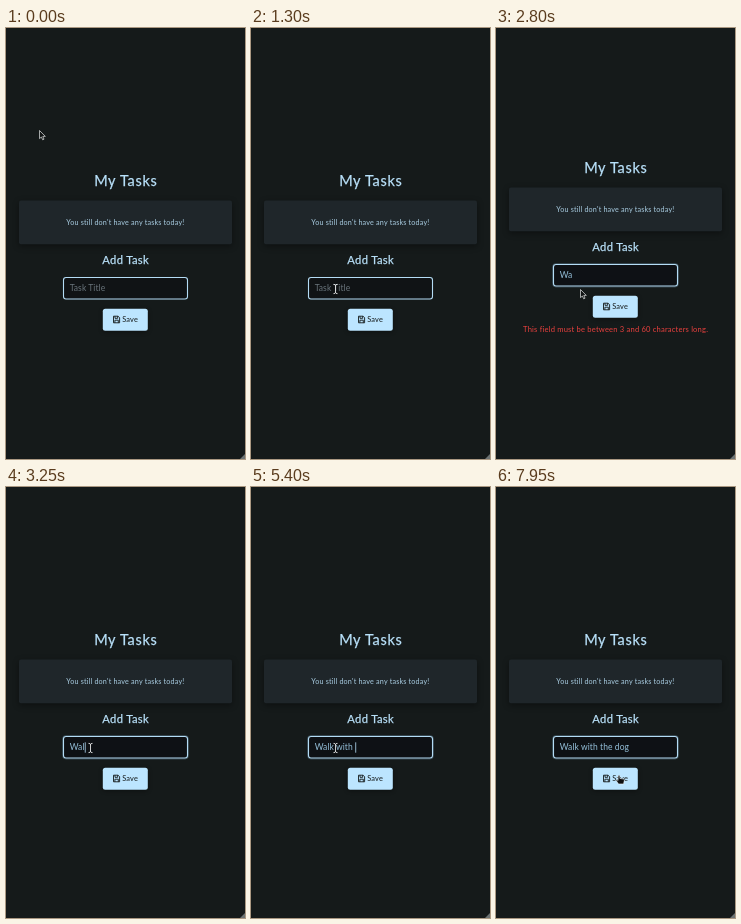
Recreate the animation shown at these times as an HTML page. Size 239 px wide and 431 px high, loop 8 s.

```html
<!DOCTYPE html>
<html lang="en">
<head>
<meta charset="utf-8">
<title>My Tasks</title>
<style>
  html, body { margin: 0; width: 100%; height: 100%; overflow: hidden; background: #151a1a; }
  svg { display: block; width: 100vw; height: 100vh; }
  text { font-family: Lato, "Open Sans", sans-serif; fill: #b9e1fa; white-space: pre; }
  .mid { text-anchor: middle; }
  .title, .sub { stroke: #b9e1fa; stroke-width: .25; }
  .title { font-size: 14.5px; letter-spacing: .7px; }
  .sub { font-size: 11.2px; letter-spacing: .36px; }
  .note { font-size: 7.2px; letter-spacing: .18px; fill: #a9cde2; }
  .field { font-size: 8.5px; letter-spacing: .08px; fill: #95c0da; }
  .hint { fill: #68737a; }
  .save { font-size: 7.4px; letter-spacing: .15px; fill: #151a1a; }
  .error { font-size: 7.6px; letter-spacing: .18px; fill: #e8403e; }
  .card { fill: #1f262a; filter: drop-shadow(0 2px 3px rgba(0, 0, 0, .4)); }
  .button { fill: #bce5ff; filter: drop-shadow(0 1px 2px rgba(0, 0, 0, .4)); }
  .icon { fill: none; stroke: #151a1a; stroke-width: .9; stroke-linejoin: round; }
</style>
</head>
<body>
<svg viewBox="0 0 239 431">
  <rect width="239" height="431" fill="#151a1a"/>
  <g id="page">
    <text class="mid title" x="119.8" y="158">My Tasks</text>
    <rect class="card" x="13" y="172.6" width="213" height="43.6" rx="2"/>
    <text class="mid note" x="119.4" y="197">You still don't have any tasks today!</text>
    <text class="mid sub" x="119.7" y="236.4">Add Task</text>

    <rect id="glow" x="56.5" y="248.5" width="126" height="23.5" rx="3.4" fill="none" stroke="#8fc4e6" stroke-opacity=".25"/>
    <rect id="box" x="57.5" y="249.5" width="124" height="21.5" rx="2.5" stroke="#b4dcf5" stroke-width="1.1"/>
    <text id="hint" class="field hint" x="63.7" y="263">Task Title</text>
    <text id="typed" class="field" x="63.7" y="263"></text>
    <rect id="caret" y="255.3" width=".8" height="10.4" fill="#b4dcf5"/>

    <rect class="button" x="96.8" y="280.8" width="45" height="22" rx="2.5"/>
    <g class="icon">
      <path d="M107.5 288.2h4.6l1.5 1.5v5.1h-6.1z"/>
      <path d="M109 288.2v2.1h2.7v-2.1M108.9 294.8v-2.6h3.4v2.6"/>
    </g>
    <text class="save" x="116.2" y="294.4">Save</text>
    <text id="error" class="mid error" x="119.6" y="317">This field must be between 3 and 60 characters long.</text>
  </g>

  <rect id="edge" x="238" width="1" height="424" fill="#3b4a4f"/>
  <path d="M239 426V431H234Z" fill="#6d7373"/>

  <path id="arrow" d="M0 .5V8.6L1.9 7L3.2 9.8L4.5 9.2L3.3 6.4H5.8Z" fill="#111414" stroke="#e6e8e8" stroke-width=".7" stroke-linejoin="round"/>
  <path id="beam" d="M-2-4.6Q0-4.6 0-3.4Q0-4.6 2-4.6M0-3.6V3.6M-2 4.6Q0 4.6 0 3.4Q0 4.6 2 4.6" fill="none" stroke="#fff" stroke-opacity=".8"/>
  <path id="hand" d="M-.9 .8Q0-.7 .9 .8V3.1L4.6 3.8Q5.5 4.1 5.3 5.2L4.5 8.6H-.4L-2.8 5.3Q-2.8 3.9-.9 5.1Z" fill="#0d0f10" stroke="#fff" stroke-width=".5" stroke-linejoin="round"/>
</svg>
<script>
  const LOOP = 8000, STEP = 50;
  const $ = id => document.getElementById(id);

  // bursts of typing: text, start, time per key
  const bursts = [
    ["Wa", 2350, 250], ["lk ", 3250, 225], ["wi", 4100, 50],
    ["th the ", 5050, 141], ["do", 6350, 150], ["g", 6950, 0]
  ];

  // pointer glides: start, end, x, y
  const home = { x: 33.5, y: 102 };
  const glides = [
    [0, 150, 33.5, 145], [300, 900, 82.5, 261],
    [1200, 1300, 84.5, 261], [7500, 7950, 123, 288.3]
  ];

  const clamp = v => Math.min(1, Math.max(0, v));
  const within = (t, a, b) => t >= a && t < b;
  const show = (el, on) => el.setAttribute("visibility", on ? "visible" : "hidden");
  const move = (el, x, y) => el.setAttribute("transform", `translate(${x} ${y})`);

  function textAt(t) {
    return bursts.map(([text, start, pace]) =>
      [...text].filter((c, i) => start + i * pace <= t).join("")).join("");
  }

  function pointerAt(t) {
    let { x, y } = home;
    for (const [start, end, toX, toY] of glides) {
      const k = clamp((t - start) / (end - start));
      x += (toX - x) * k;
      y += (toY - y) * k * (2 - k);
    }
    return { x, y };
  }

  function pointerKind(t, { x, y }) {
    if (y > 281) return "hand";
    const overInput = x > 66.5 && within(y, 249, 272);
    return overInput && !within(t, 2250, 3250) ? "beam" : "arrow";
  }

  function draw(t) {
    const text = textAt(t);
    const focused = t >= 1550;
    const invalid = within(text.length, 1, 3);

    move($("page"), 0, invalid ? -13 : 0);
    show($("error"), invalid);
    show($("glow"), focused);
    $("box").setAttribute("fill", focused ? "#0e1115" : "#101315");

    show($("hint"), !text);
    $("typed").textContent = text;
    $("caret").setAttribute("x", 64 + (text ? $("typed").getComputedTextLength() : 0));
    show($("caret"), within(t, 1550, 7750) && !within(t, 2800, 3250) && !within(t, 3900, 4100));
    $("edge").setAttribute("opacity", focused ? clamp((2800 - t) / 200) : 0);

    const at = pointerAt(t), kind = pointerKind(t, at);
    for (const id of ["arrow", "beam", "hand"]) show($(id), id === kind);
    move($(kind), at.x, at.y);
  }

  const start = performance.now();
  function tick() {
    const t = Math.max(0, performance.now() - start) % LOOP;
    draw(Math.floor(t / STEP) * STEP);
    requestAnimationFrame(tick);
  }
  tick();
</script>
</body>
</html>
```
